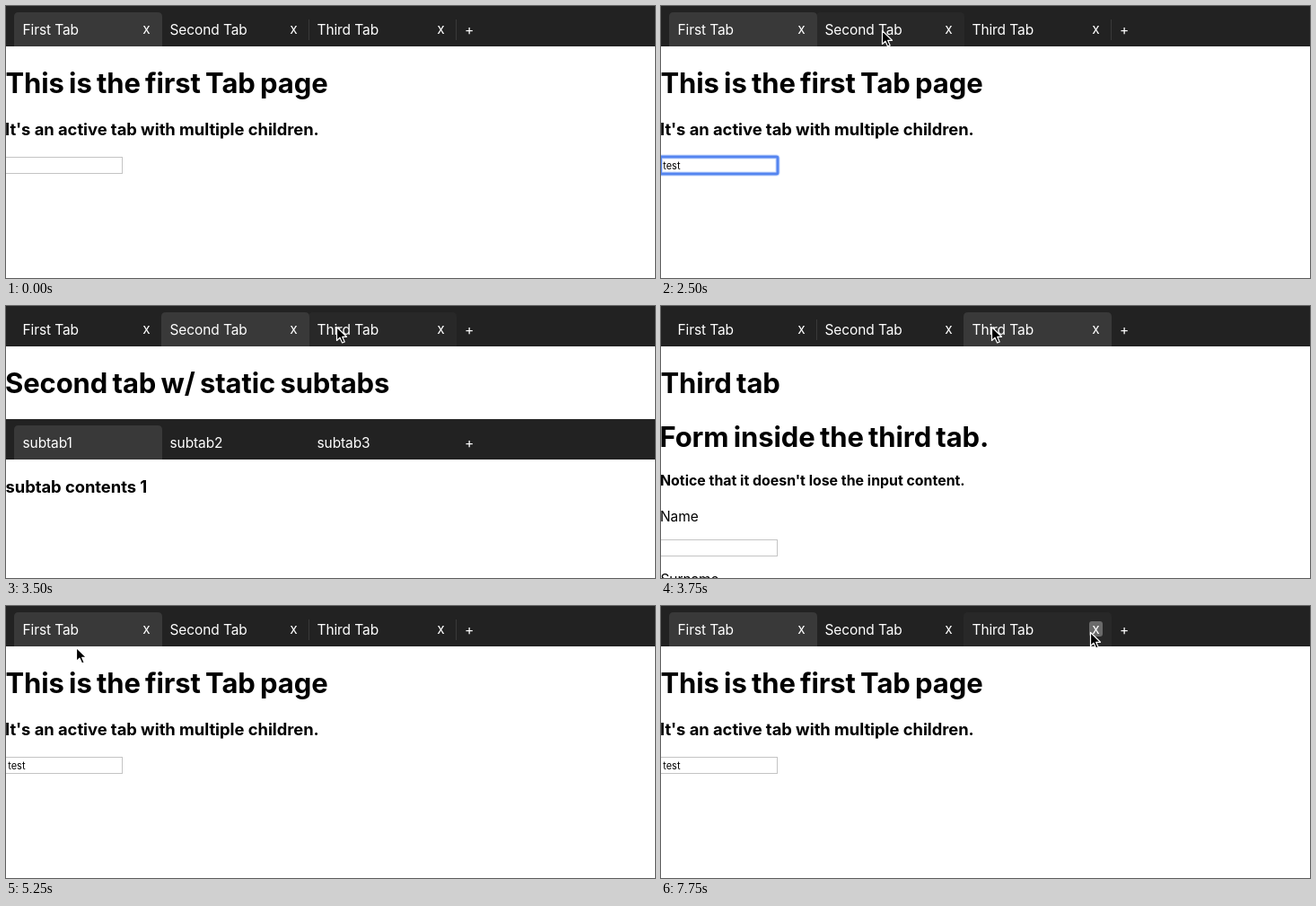
Animation of 723 by 303 pixels, one loop 8000 ms. Source, as an HTML page:

```html
<!DOCTYPE html>
<html lang="en">
<head>
<meta charset="utf-8">
<title>Tabs</title>
<style>
  html, body { margin: 0; width: 100%; height: 100%; overflow: hidden; background: #fff; }
  svg { display: block; width: 723px; height: 303px; }
  text { font-family: Inter, Roboto, sans-serif; font-optical-sizing: none; white-space: pre; }
  .bar { fill: #222; }
  .active { fill: #393939; }
  .hover { fill: #282828; }
  .label { fill: #fff; font-size: 15.5px; letter-spacing: -.1px; }
  .mid { text-anchor: middle; }
  .line { stroke: #393939; }
  .h1 { font-size: 31px; font-weight: 700; letter-spacing: -.1px; word-spacing: -2px; }
  .h3 { font-size: 18.4px; font-weight: 700; letter-spacing: -.05px; }
  .h4 { font-size: 15.9px; font-weight: 700; }
  .body { font-size: 15.5px; letter-spacing: -.1px; }
  .value { font-size: 11px; }
  .field { fill: #fff; stroke: #c4c4c4; }
  .ring { fill: none; stroke: #5585f0; stroke-width: 3; }
  .glow { fill: none; stroke: #a9c3fb; stroke-width: 5; opacity: .6; }
  .arrow { fill: #000; stroke: #fff; stroke-width: 1.2; stroke-linejoin: round; }
  .beam { fill: none; stroke: #333; }
</style>
</head>
<body>
<svg id="stage" viewBox="0 0 723 303"></svg>
<script>
const LOOP = 8000;
const HOVER_LAG = 250;
const TAB_X = [9, 173, 337];
const TAB_W = 165;
const stage = document.getElementById("stage");

// Each step changes only the listed properties and keeps the rest.
const steps = [
  { at: 0, page: 0, value: "", focus: false, pointer: null },
  { at: 250, pointer: [238, 192] },
  { at: 500, pointer: [152, 187] },
  { at: 750, pointer: [100, 185], beam: true },
  { at: 1250, focus: true },
  { at: 1500, value: "te", pointer: null },
  { at: 1750, value: "test" },
  { at: 2000, pointer: [205, 112], beam: false },
  { at: 2250, pointer: [245, 38] },
  { at: 2500, pointer: [247, 28] },
  { at: 2750, page: 1, focus: false },
  { at: 3000, pointer: [272, 27] },
  { at: 3250, pointer: [345, 25] },
  { at: 3500, pointer: [369, 24] },
  { at: 3750, page: 2 },
  { at: 4250, pointer: [312, 25] },
  { at: 4500, pointer: [180, 26] },
  { at: 4750, pointer: [84, 28] },
  { at: 5000, page: 0 },
  { at: 5250, pointer: [79, 47] },
  { at: 5500, pointer: [86, 100] },
  { at: 5750, pointer: [122, 202] },
  { at: 6000, pointer: [190, 138] },
  { at: 6250, pointer: [262, 62] },
  { at: 6500, pointer: [312, 28] },
  { at: 6750, pointer: [354, 22] },
  { at: 7000, pointer: [425, 25] },
  { at: 7250, pointer: [506, 28] },
  { at: 7500, pointer: [492, 31] },
  { at: 7750, pointer: [479, 30] }
];

const stateAt = time => Object.assign({}, ...steps.filter(step => step.at <= Math.max(time, 0)));

const text = (x, y, kind, content) => `<text x="${x}" y="${y}" class="${kind}">${content}</text>`;

const tabShape = (x, y, kind) =>
  `<path class="${kind}" d="M${x} ${y + 38}v-33q0-5 5-5h${TAB_W - 10}q5 0 5 5v33z"/>`;

function tabUnder(pointer) {
  if (!pointer || pointer[1] < 7 || pointer[1] >= 45) return -1;
  return TAB_X.findIndex(x => pointer[0] >= x && pointer[0] < x + 164);
}

function tabBar(y, labels, active) {
  return `<rect class="bar" y="${y}" width="723" height="45"/>` +
    tabShape(TAB_X[active], y + 7, "active") +
    labels.map((label, i) => text(TAB_X[i] + 9.5, y + 32, "label", label)).join("") +
    text(516, y + 32, "label mid", "+");
}

// Dividers react to the pointer at once, the tab background a little later.
function mainBar({ page, pointer }, tinted) {
  const hovered = tabUnder(pointer);
  const lit = i => i === page || i === hovered;
  let out = tabBar(0, ["First Tab", "Second Tab", "Third Tab"], page);
  if (tinted >= 0 && tinted !== page)
    out = out.replace("<path", tabShape(TAB_X[tinted], 7, "hover") + "<path");
  TAB_X.forEach((x, i) => {
    if (i === hovered && Math.abs(pointer[0] - x - 147) < 8)
      out += `<rect x="${x + 140}" y="17" width="15" height="17" rx="3" fill="#6a6a6a"/>`;
    out += text(x + 147.5, 31, "label mid", "x");
    if (!lit(i) && !lit(i + 1)) out += `<path class="line" d="M${x + 164.5} 15v23"/>`;
  });
  return out;
}

function field(y, value, focus) {
  let out = `<rect class="field" x="-1.5" y="${y + .5}" width="131" height="18"/>`;
  if (focus) {
    const box = `x="-.5" y="${y}" width="130.5" height="19" rx="1.5"`;
    out += `<rect class="glow" ${box}/><rect class="ring" ${box}/>`;
  }
  return out + text(2.2, y + 14, "value", value);
}

const pages = [
  s => text(-.5, 97, "h1", "This is the first Tab page") +
    text(-1, 144, "h3", "It's an active tab with multiple children.") +
    field(168, s.value, s.focus),
  () => text(-1, 97, "h1", "Second tab w/ static subtabs") +
    tabBar(126, ["subtab1", "subtab2", "subtab3"], 0) +
    text(-.5, 208, "h3", "subtab contents 1"),
  () => text(-.5, 97, "h1", "Third tab") +
    text(-1.5, 157, "h1", "Form inside the third tab.") +
    text(-1, 200, "h4", "Notice that it doesn't lose the input content.") +
    text(-1, 240, "body", "Name") + field(260, "", false) +
    text(-.5, 310, "body", "Surname")
];

function cursor({ pointer, beam }) {
  if (!pointer) return "";
  const [x, y] = pointer;
  const shape = beam
    ? '<path class="beam" d="M-3-7.5q3 0 3 2v11q0 2 3 2M3-7.5q-3 0-3 2v11q0 2-3 2"/>'
    : '<path class="arrow" d="M-.5-.5v15l3.5-3.3 2.6 5.8 2.6-1.1-2.5-5.6h4.8z"/>';
  return `<g transform="translate(${x} ${y})">${shape}</g>`;
}

let shown = "";
function draw(time) {
  const state = stateAt(time);
  const tinted = tabUnder(stateAt(time - HOVER_LAG).pointer);
  const picture = mainBar(state, tinted) + pages[state.page](state) + cursor(state);
  if (picture !== shown) stage.innerHTML = shown = picture;
}

const start = performance.now();
function tick() {
  draw((performance.now() - start) % LOOP);
  requestAnimationFrame(tick);
}
tick();
</script>
</body>
</html>
```
